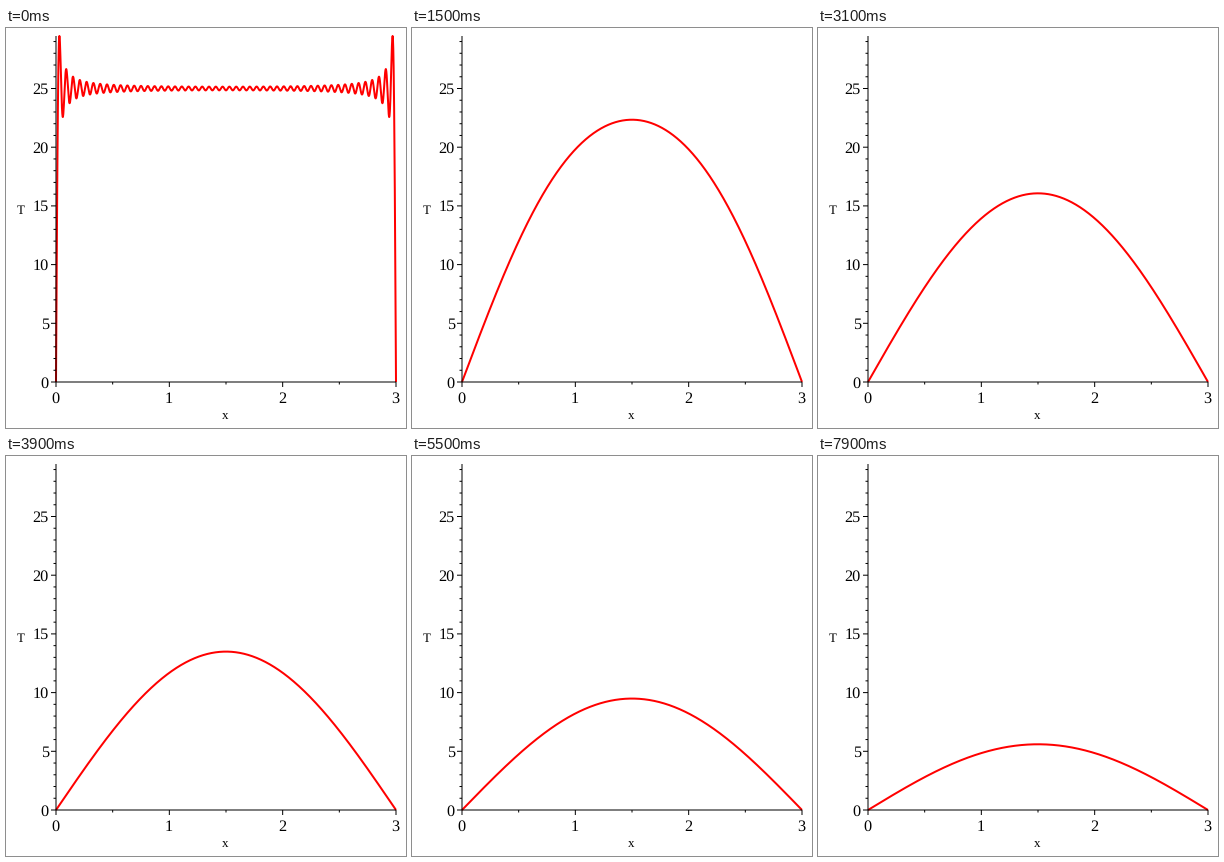
A matplotlib script that plays this animation: 400 px wide and 400 px high, repeating every 8 s.

```python
import numpy as np
import matplotlib.pyplot as plt
from matplotlib.animation import FuncAnimation

SIZE, DPI = 400, 100
PX = 72 / DPI                       # one pixel in points
FRAMES, INTERVAL = 80, 100
X0, Y0 = 50, 354                    # plot origin in pixels
SX, SY = 340 / 3, 11.74             # pixels per unit
LENGTH, T_START, TERMS = 3, 25, 50
DECAY = 0.022                       # first-mode decay per step

plt.rcParams["font.family"] = "Liberation Serif"
plt.rcParams["text.hinting"] = "none"

fig = plt.figure(figsize=(SIZE / DPI, SIZE / DPI), dpi=DPI, facecolor="white")
ax = fig.add_axes([0, 0, 1, 1])
ax.set(xlim=(0, SIZE), ylim=(SIZE, 0))
ax.axis("off")


def rule(xs, ys):
    ax.plot(xs, ys, color="black", lw=PX, solid_capstyle="butt",
            snap=False, zorder=3)


def label(x, y, text, size=16.3, ha="center"):
    ax.text(x, y, text, fontsize=size * PX, ha=ha, va="baseline", color="black")


def draw_axes():
    rule([X0, X0], [8, Y0])
    rule([X0, X0 + LENGTH * SX], [Y0, Y0])
    for v in range(30):
        y = Y0 - SY * v
        major = v % 5 == 0
        rule([X0 - (5 if major else 2.5), X0], [y, y])
        if major:
            label(42.8, y + 5.4, str(v), ha="right")
    for i in range(2 * LENGTH + 1):
        x = X0 + SX * i / 2
        major = i % 2 == 0
        rule([x, x], [Y0, Y0 + (5 if major else 2.5)])
        if major:
            label(x - 0.8, 375, str(i // 2))
    label(15, 186, "T", 13)
    label(219.5, 391, "x", 13)


x = np.linspace(0, LENGTH, 2001)
n = np.arange(1, 2 * TERMS, 2)
modes = np.sin(np.outer(x, n) * np.pi / LENGTH)
coeffs = 4 * T_START / (np.pi * n)


def temperature(step):
    return modes @ (coeffs * np.exp(-DECAY * n**2 * step))


draw_axes()
curve, = ax.plot([], [], color="red", lw=2 * PX, solid_capstyle="butt",
                 solid_joinstyle="round", snap=False, zorder=2)


def update(step):
    curve.set_data(X0 + SX * x, Y0 - SY * temperature(step))
    return curve,


anim = FuncAnimation(fig, update, frames=FRAMES, interval=INTERVAL,
                     repeat=True, repeat_delay=0)
plt.show()
```
